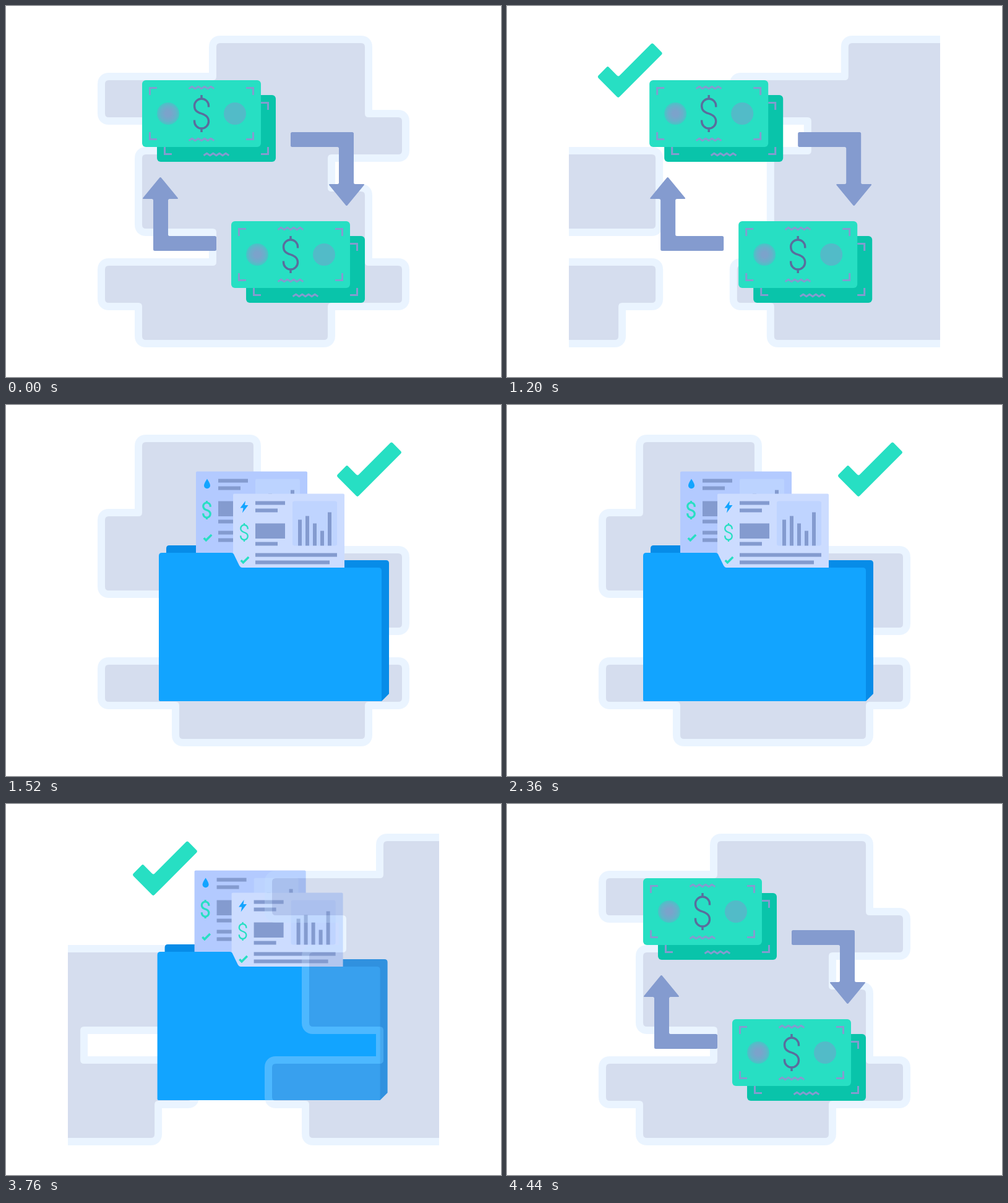
Animation, 800 px wide and 600 px high, one loop 4.48 s. Source, as an HTML page:

```html
<!DOCTYPE html>
<html lang="en">
<head>
<meta charset="utf-8">
<title>Money to files</title>
<style>
  html, body { margin: 0; width: 100%; height: 100%; overflow: hidden; background: #fff; }
  svg { display: block; width: 800px; height: 600px; }
</style>
</head>
<body>
<svg viewBox="0 0 800 600">
  <defs>
    <clipPath id="window"><rect x="100" width="600" height="600"/></clipPath>
    <radialGradient id="seal">
      <stop offset=".25" stop-color="#7ba3cb"/>
      <stop offset=".7" stop-color="#66b1ca"/>
      <stop offset="1" stop-color="#45c6c6"/>
    </radialGradient>
    <path id="dollar" fill="none" d="M0-30V-24M0 24V30M11.5-10.5V-12.5A11.5 11.5 0 0 0-11.5-12.5C-11.5-5-7-2.2 0 0S11.5 6 11.5 12.5A11.5 11.5 0 0 1-11.5 12.5V10.5"/>
    <path id="tick" fill="#27dfc3"/>
    <g id="marks" fill="none" stroke="#849bcf" stroke-width="3">
      <path d="M12.5 24V12.5H24M168 12.5H179.5V24M12.5 84V95.5H24M168 95.5H179.5V84"/>
      <path id="waveTop" stroke-linejoin="round"/>
      <path id="waveLow" stroke-linejoin="round"/>
    </g>
    <g id="bills">
      <g transform="translate(24 24)">
        <rect width="192" height="108" rx="6" fill="#09c4aa"/>
        <use href="#marks"/>
      </g>
      <rect width="192" height="108" rx="6" fill="#27dfc3"/>
      <use href="#marks"/>
      <circle cx="42" cy="54" r="18" fill="url(#seal)"/>
      <circle cx="150" cy="54" r="18" fill="#52bbc8"/>
      <use href="#dollar" x="96" y="54" stroke="#5a6d9d" stroke-width="3.4"/>
    </g>
    <path id="arrow" fill="#849bcf"/>
    <g id="sheet">
      <path id="lines" fill="#849bcf"/>
      <use href="#tick" transform="translate(19 107.5) scale(.14)"/>
    </g>
    <path id="bars" fill="#849bcf"/>
  </defs>
  <g clip-path="url(#window)">
    <g id="filesBack"></g>
    <g id="folder">
      <path fill="#078ce8" d="M232 479V232Q232 227 237 227H330Q336 227 339 233L348 251H587Q592 251 592 256V467L580 479Z"/>
      <g transform="translate(280 107.5)">
        <path fill="#b3caff" d="M0 150V2Q0 0 2 0H178Q180 0 180 2V150Z"/>
        <rect x="96" y="12" width="72" height="72" rx="3" fill="#bcd3ff"/>
        <use href="#bars"/>
        <use href="#sheet"/>
        <path fill="#12a4ff" d="M18 12C18 12 13 19 13 22.8A5 5 0 0 0 23 22.8C23 19 18 12 18 12Z"/>
        <use href="#dollar" transform="translate(17.5 62.5) scale(.5)" stroke="#27dfc3" stroke-width="6.4"/>
      </g>
      <g transform="translate(340 143.5)">
        <path fill="#ccdcff" d="M0 125V2Q0 0 2 0H178Q180 0 180 2V125Z"/>
        <rect x="96" y="12" width="72" height="72" rx="3" fill="#bfd4ff"/>
        <use href="#bars"/>
        <use href="#sheet"/>
        <path fill="#12a4ff" d="M20 11.5L11.5 23H16.5L15 31L24.500 18.500H19Z"/>
        <use href="#dollar" transform="translate(18 62.500) scale(.5)" stroke="#27dfc3" stroke-width="4.600"/>
      </g>
      <path fill="#12a4ff" d="M220 477V244Q220 239 225 239H337Q340 239 341 241L350 259.500Q352 263 355 263H575Q580 263 580 268V479H222Q220 479 220 477Z"/>
    </g>
    <use id="check" href="#tick"/>
    <g id="moneyBack"></g>
    <g id="money">
      <use href="#bills" x="220" y="120"/>
      <use href="#bills" x="364" y="348"/>
      <use href="#arrow"/>
      <use href="#arrow" transform="rotate(180 400 300)"/>
    </g>
  </g>
</svg>
<script>
const el = id => document.getElementById(id);

// Polygon with every corner rounded by radius r
function rounded(points, r) {
  const n = points.length;
  const toward = ([x, y], [u, v]) => {
    const k = r / Math.hypot(u - x, v - y);
    return [x + (u - x) * k, y + (v - y) * k];
  };
  return points.map((p, i) => {
    const a = toward(p, points[(i + n - 1) % n]);
    const b = toward(p, points[(i + 1) % n]);
    return `${i ? "L" : "M"}${a}Q${p} ${b}`;
  }).join("") + "Z";
}

// Orthogonal outline: start point, then alternating x and y
function steps(x, y, turns) {
  return turns.map((v, i) => (i % 2 ? y = v : x = v, [x, y]));
}

function backdrop(id, points) {
  const d = rounded(points, 6);
  el(id).setAttribute("opacity", ".333");
  el(id).innerHTML =
    `<path d="${d}" fill="none" stroke="#c3e1ff" stroke-width="24" stroke-linejoin="round"/>` +
    `<path d="${d}" fill="#849bcf"/>`;
}

backdrop("moneyBack", steps(340, 60, [
  580, 180, 640, 240, 520, 300, 580, 420, 640, 480, 520, 540, 220, 480,
  160, 420, 340, 360, 220, 240, 280, 180, 160, 120, 340, 60]));
backdrop("filesBack", steps(220, 60, [
  400, 240, 640, 360, 460, 420, 640, 480, 580, 540, 280, 480,
  160, 420, 280, 300, 160, 180, 220, 60]));

// Check mark around its own centre
el("tick").setAttribute("d", rounded(
  [[-53, 10], [-36, -7.5], [-19, 10], [36, -45], [53, -28], [-19, 44.5]], 3));
el("arrow").setAttribute("d", rounded(
  [[460, 204], [562, 204], [562, 288], [580, 288], [550.5, 324], [521, 288], [538, 288], [538, 228], [460, 228]], 2.5));

const wave = y => "M" + Array.from({ length: 9 }, (_, i) => [75.5 + i * 5.1, y + (i % 2 ? -1.700 : 1.700)]).join("L");
el("waveTop").setAttribute("d", wave(12));
el("waveLow").setAttribute("d", wave(96));

const box = (x, y, w, h) => `M${x} ${y}h${w}v${h}h${-w}z`;
el("lines").setAttribute("d", [
  [12, 48, 6], [24, 36, 6], [48, 48, 24.500], [78, 36, 6], [96, 132, 6], [108, 120, 6]
].map(([y, w, h]) => box(36, y, w, h)).join(""));
el("bars").setAttribute("d", [42, 48, 36, 24, 54].map((h, i) => box(105 + i * 12, 84 - h, 6, h)).join(""));

// Smooth curve through [time, value] points, flat at both ends
function curve(points) {
  const slope = points.map((_, i) => {
    const a = points[i - 1], b = points[i + 1];
    return a && b ? (b[1] - a[1]) / (b[0] - a[0]) : 0;
  });
  return t => {
    if (t <= 0) return 0;
    const i = points.findIndex(p => p[0] > t) - 1;
    if (i < 0) return 1;
    const [t0, v0] = points[i], [t1, v1] = points[i + 1];
    const h = t1 - t0, s = (t - t0) / h, q = 1 - s;
    return v0 * (1 + 2 * s) * q * q + v1 * s * s * (3 - 2 * s)
      + h * s * q * (slope[i] * q - slope[i + 1] * s);
  };
}

const backMove = curve([[0, 0], [80, .022], [140, .12], [200, .353], [240, .55], [300, .8], [340, .91], [400, .987], [460, 1]]);
const frontMove = curve([[0, 0], [80, -.008], [160, -.026], [200, -.017], [240, .041], [300, .295], [350, .57],
  [400, .752], [460, .885], [520, .955], [600, .985], [720, .997], [880, 1]]);

const LOOP = 4480, STEP = 40, OUT = 1000, BACK = 3520, SPAN = 600;
const slide = (id, x, y = 0) => el(id).setAttribute("transform", `translate(${x.toFixed(2)} ${y})`);
const there = (move, t) => move(t - OUT) - move(t - BACK);

function draw(now) {
  const t = Math.floor(now % LOOP / STEP) * STEP;
  const back = SPAN * there(backMove, t);
  const front = SPAN * there(frontMove, t);
  slide("moneyBack", back);
  slide("filesBack", (back - SPAN) * 1.03);
  slide("check", 587 + back - SPAN, 104.500);
  slide("money", -front);
  slide("folder", SPAN - front);
}

const start = performance.now();
function tick() {
  draw(performance.now() - start);
  requestAnimationFrame(tick);
}
tick();
</script>
</body>
</html>
```
